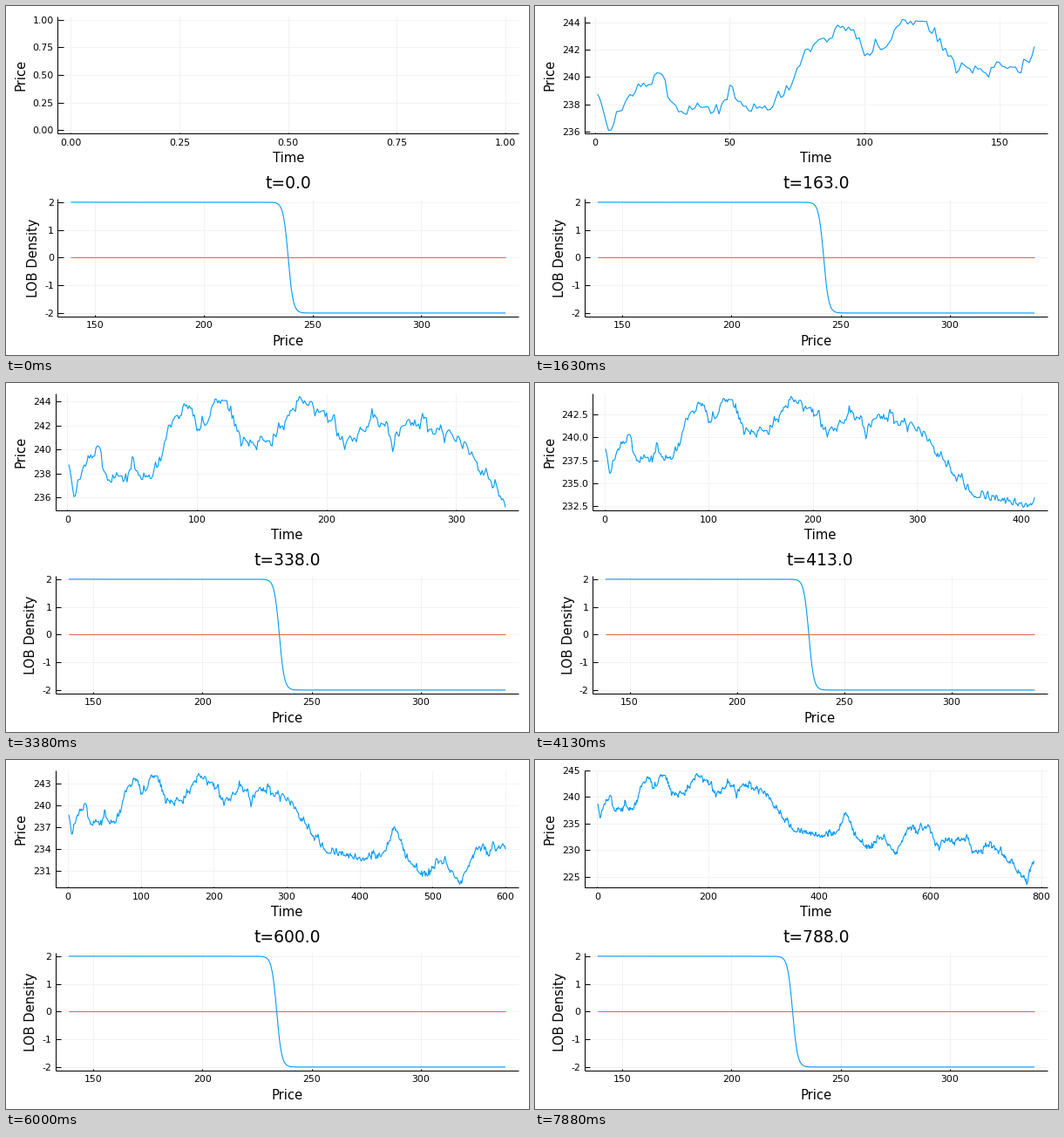
A matplotlib script for the animation above (8000 ms loop, 600 by 400 pixels).

```python
import math

import matplotlib.pyplot as plt
import numpy as np
from matplotlib.animation import FuncAnimation

W, H, DPI = 600, 400, 100
FRAMES, INTERVAL = 64, 125
BLUE, ORANGE, GRID = "#009AFA", "#E26F46", "0.95"
RIGHT, PANEL_H = 588, 134.6
TOP_Y, LOW_Y = 11.7, 221.1
TICK_PX, LABEL_PX, TITLE_PX = 10.9, 14.8, 18.8
STEEPNESS = 0.44

# Main turning points of the price: (time, price).
TURNS = [
    (1, 238.75), (5, 236.1), (16, 239.5), (23, 240.3), (30, 237.9),
    (46, 237.3), (50, 239.4), (58, 237.5), (69, 238.5), (78, 242.0),
    (90, 243.8), (108, 242.2), (114, 244.2), (126, 243.6), (135, 240.5),
    (158, 240.3), (179, 244.4), (212, 241.1), (235, 243.4), (249, 241.1),
    (274, 243.0), (311, 239.6), (338, 235.2), (355, 233.5), (402, 232.4),
    (429, 233.0), (448, 237.1), (463, 232.8), (486, 230.3), (509, 232.3),
    (537, 229.2), (560, 234.3), (600, 234.0), (615, 231.0), (660, 232.0),
    (681, 229.9), (720, 230.2), (774, 223.6), (788, 228.0),
]


def make_prices():
    """Mean-reverting noise pinned to the turning points."""
    knots, levels = np.array(TURNS).T
    steps = np.arange(1, int(knots[-1]) + 1)
    base = np.interp(steps, knots, levels)
    noise = np.zeros(len(steps))
    shocks = np.random.default_rng(7).normal(0, 0.36, len(steps))
    for i in range(1, len(steps)):
        noise[i] = 0.7 * noise[i - 1] + shocks[i]
    noise -= np.interp(steps, knots, noise[knots.astype(int) - 1])
    # Fold back at the running extremes so the turning points set the range.
    low, high = np.minimum.accumulate(base), np.maximum.accumulate(base)
    prices = low + np.abs(base + noise - low)
    return steps, high - np.abs(high - prices)


STEPS, PRICES = make_prices()
P0 = PRICES[0]
GRID_X = np.linspace(P0 - 100, P0 + 100, 801)


def widen(lo, hi):
    pad = 0.03 * (hi - lo)
    return lo - pad, hi + pad


def nice_ticks(lo, hi):
    """Best scoring round ticks, judged by count, zero, coverage and step."""
    span = hi - lo
    top = math.ceil(math.log10(span))
    best, result = -1, None
    for z in range(top, top - 4, -1):
        for k in range(4, 9):
            for q, nice in ((1, 1), (5, .9), (2, .7), (2.5, .5), (3, .2)):
                step = q * 10.0 ** z
                first = math.ceil(lo / step - 1e-9)
                last = math.floor(hi / step + 1e-9)
                if last - first + 1 != k:
                    continue
                zero = first <= 0 <= last
                score = (max(0, 1 - abs(k - 5) / 5) / 4 + zero / 6
                         + 0.5 * span / ((k - 1) * step) + nice / 4)
                if score > best + 1e-9:
                    best = score
                    result = [i * step for i in range(first, last + 1)], step
    ticks, step = result
    places = next(d for d in range(6)
                  if abs(step * 10 ** d - round(step * 10 ** d)) < 1e-6)
    return ticks, [f"{v:.{places}f}" for v in ticks]


fig = plt.figure(figsize=(W / DPI, H / DPI), dpi=DPI, facecolor="white")
ax = fig.add_axes([0, 0, 1, 1])


def line(x, y, color="black", width=1.0):
    ax.plot(x, y, color=color, lw=width * 72 / DPI, solid_capstyle="butt",
            solid_joinstyle="round")


def text(x, y, s, px, ha="center", rotation=0):
    ax.text(x, y, s, fontsize=px * 72 / DPI, family="DejaVu Sans", ha=ha,
            va="baseline", rotation=rotation, rotation_mode="anchor")


def panel(left, top, xlim, ylim, xlabel, ylabel, ylabel_x):
    """Draw grid, axes and labels; return the data-to-pixel mapping."""
    width, bottom = RIGHT - left, top + PANEL_H

    def to_px(x, y):
        return (left + (np.asarray(x) - xlim[0]) / (xlim[1] - xlim[0]) * width,
                bottom - (np.asarray(y) - ylim[0]) / (ylim[1] - ylim[0]) * PANEL_H)

    xticks, yticks = nice_ticks(*xlim), nice_ticks(*ylim)
    xs = to_px(xticks[0], ylim[0])[0]
    ys = to_px(xlim[0], yticks[0])[1]
    for x in xs:
        line([x, x], [top, bottom], GRID)
    for y in ys:
        line([left, RIGHT], [y, y], GRID)
    line([left, RIGHT], [bottom, bottom])
    line([left, left], [top, bottom])
    for x, s in zip(xs, xticks[1]):
        line([x, x], [bottom, bottom - 0.012 * PANEL_H])
        text(x, bottom + 13.6, s, TICK_PX)
    for y, s in zip(ys, yticks[1]):
        line([left, left + 0.012 * width], [y, y])
        text(left - 4.6, y + 4, s, TICK_PX, ha="right")
    text((left + RIGHT) / 2, bottom + 32.9, xlabel, LABEL_PX)
    text(ylabel_x, top + PANEL_H / 2, ylabel, LABEL_PX, rotation=90)
    return to_px


def left_edge(labels):
    return max(37.1 + 6.6 * sum(c.isdigit() for c in s) + 2.55 * ("." in s)
               for s in labels)


def update(k):
    ax.clear()
    ax.set(xlim=(0, W), ylim=(H, 0))
    ax.axis("off")

    t = int(12.5 * k + 0.5)
    steps, prices = STEPS[:t], PRICES[:t]
    xlim = ylim = widen(0, 1)
    if t:
        xlim = widen(1, t)
        ylim = widen(prices.min(), prices.max())
    left = left_edge(nice_ticks(*ylim)[1])

    to_px = panel(left, TOP_Y, xlim, ylim, "Time", "Price", 21.8)
    if t:
        line(*to_px(steps, prices), BLUE, 1.1)

    to_px = panel(left, LOW_Y, widen(P0 - 100, P0 + 100), widen(-2, 2),
                  "Price", "LOB Density", left - 23.5)
    mid = prices[-1] if t else P0
    line(*to_px(GRID_X, 2 * np.tanh(STEEPNESS * (mid - GRID_X))), BLUE, 1.1)
    line(*to_px(GRID_X[[0, -1]], [0, 0]), ORANGE, 1.1)
    text((left + RIGHT) / 2, 208.6, f"t={t:.1f}", TITLE_PX)
    return []


anim = FuncAnimation(fig, update, frames=FRAMES, interval=INTERVAL,
                     init_func=lambda: [], repeat=True, repeat_delay=0)
plt.show()
```
